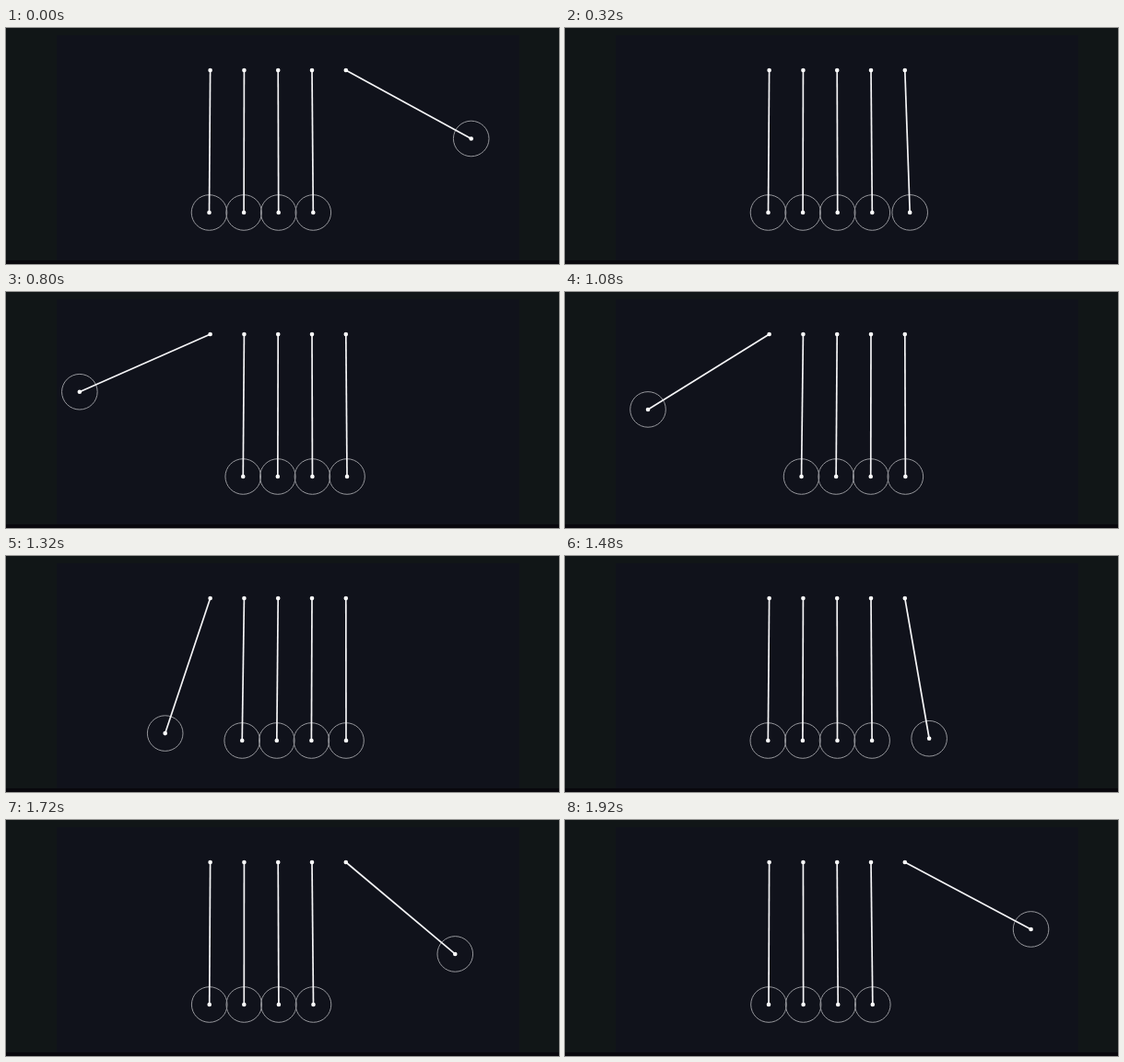
An HTML page with a canvas that plays this animation: 600 px wide and 257 px high, repeating every 2000 ms.

```html
<!DOCTYPE html>
<html lang="en">
<head>
<meta charset="utf-8">
<title>Newton's cradle</title>
<style>
  html, body { margin: 0; width: 100%; height: 100%; overflow: hidden; background: #111617; }
  canvas { display: block; }
</style>
</head>
<body>
<canvas id="stage" width="600" height="257"></canvas>
<script>
const ctx = document.getElementById('stage').getContext('2d');
const LOOP = 2000, LENGTH = 155, RADIUS = 19.3, TOP = 46;
const PIVOT_GAP = 36.8, BALL_GAP = 37.6, FREQ = 0.2064;
const pivotX = n => 221.6 + PIVOT_GAP * n;

// Time is counted in ticks of 1/15 s, shown on a 80/40/80 ms rhythm.
function tickAt(ms) {
  const rest = ms % 200;
  return Math.floor(ms / 200) * 3 + (rest >= 80) + (rest >= 120);
}

// Large-angle pendulum released from rest; returns the sideways offset.
function swing(degrees, ticks) {
  const a = degrees * Math.PI / 180;
  const phase = FREQ * ticks / (1 + a ** 2 / 16 + 11 * a ** 4 / 3072);
  const c = a * a / 192;
  return LENGTH * Math.sin(a * ((1 + c) * Math.cos(phase) - c * Math.cos(3 * phase)));
}

// The x of all five balls: four touching, one swinging out.
function ballsAt(tick) {
  const row = x => [0, 1, 2, 3].map(n => x + BALL_GAP * n);
  if (tick > 5 && tick < 21.3) {
    const drift = 257.1 + 0.9 * Math.cos(FREQ * (tick - 5.1));
    return [pivotX(0) - swing(67.5, tick - 13.1), ...row(drift)];
  }
  return tick <= 5
    ? [...row(220.5), pivotX(4) + swing(74.4, tick + 3.35)]
    : [...row(220.5 + 0.1 * (tick - 24)), pivotX(4) + swing(62.1, tick - 29.4)];
}

function rect(color, x, y, w, h) {
  ctx.fillStyle = color;
  ctx.fillRect(x, y, w, h);
}

function circle(x, y, r) {
  ctx.beginPath();
  ctx.arc(x, y, r, 0, 2 * Math.PI);
}

function drawBall(x, n) {
  const px = pivotX(n);
  const y = TOP + Math.sqrt(LENGTH ** 2 - (x - px) ** 2);
  ctx.strokeStyle = '#96979c';
  ctx.lineWidth = 1;
  circle(x, y, RADIUS);
  ctx.stroke();

  ctx.strokeStyle = '#f4f4f6';
  ctx.lineWidth = 1.7;
  ctx.beginPath();
  ctx.moveTo(px, TOP);
  ctx.lineTo(x, y);
  ctx.stroke();

  ctx.fillStyle = '#fff';
  for (const [cx, cy] of [[px, TOP], [x, y]]) {
    circle(cx, cy, 2.3);
    ctx.fill();
  }
}

function draw() {
  rect('#111617', 0, 0, 600, 257);
  rect('#10121b', 55, 8, 502, 245);
  rect('#09080d', 0, 253, 600, 4);
  ballsAt(tickAt(performance.now() % LOOP)).forEach(drawBall);
  requestAnimationFrame(draw);
}
draw();
</script>
</body>
</html>
```
